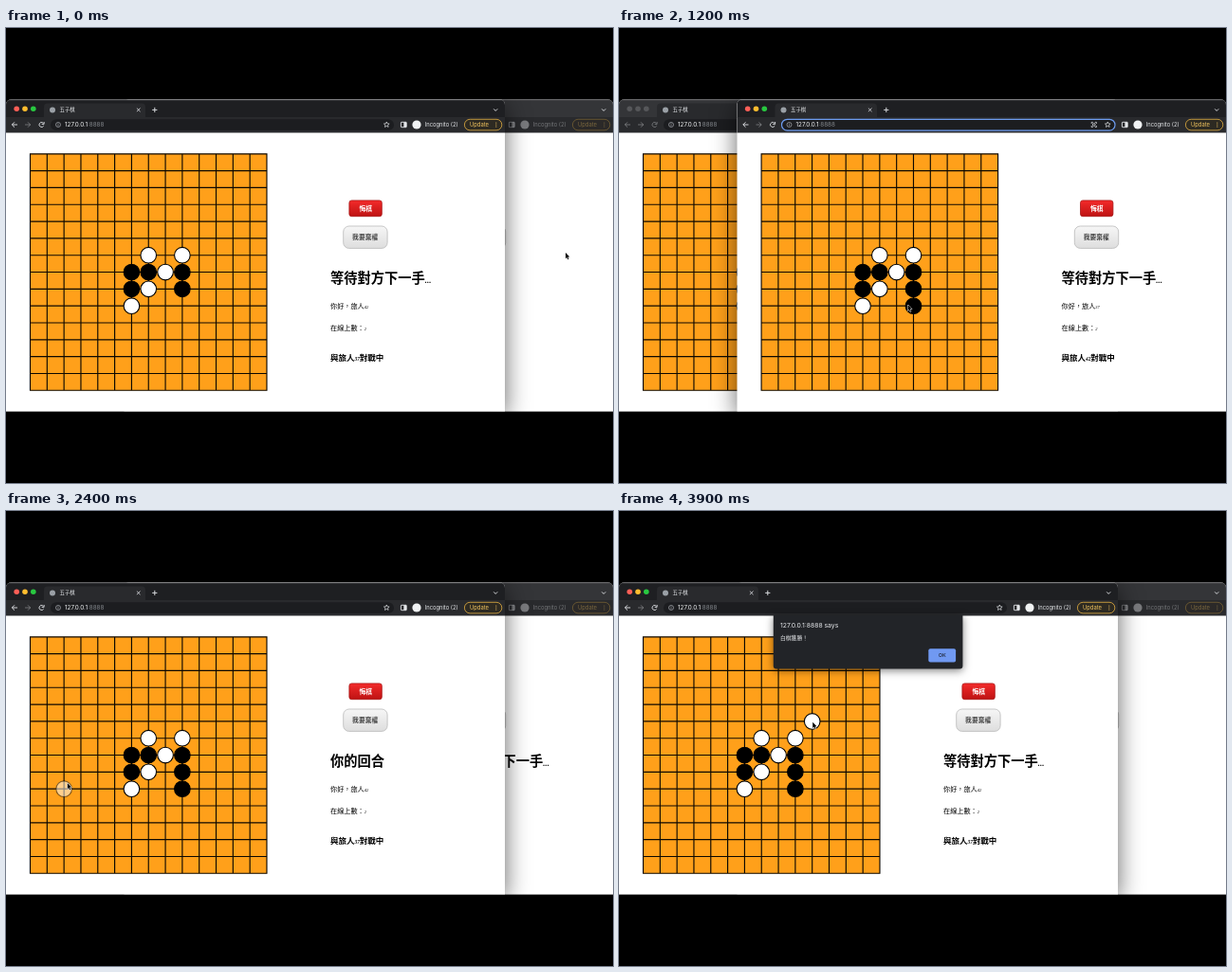
Animation of 640 by 480 pixels, one loop 4 s. Source, as an HTML page with a canvas:

```html
<!DOCTYPE html>
<html lang="zh-Hant">
<head>
<meta charset="utf-8">
<title>五子棋</title>
<style>
html, body { margin: 0; width: 100%; height: 100%; overflow: hidden; background: #000; }
canvas { display: block; }
</style>
</head>
<body>
<canvas id="stage" width="640" height="480"></canvas>
<script>
const ctx = document.getElementById('stage').getContext('2d');
const LOOP = 4000, STEP = 100;
const CELL = 17.82, BOARD = { x: 25.5, y: 132.8, n: 14 };
const UI = 'Inter, Roboto, sans-serif';
const CJK = '"Noto Sans CJK TC", "Noto Sans CJK JP", sans-serif';
const SMALL = '"Liberation Serif", serif';
const MINE = '你的回合', WAIT = '等待對方下一手...';

// Times of the events that change the picture at once
const RAISE_R = 300, FOCUS_R = 400, BLACK_MOVE = 1000, HOVER_L = 1600,
      RAISE_L = 2100, FOCUS_L = 2200, WHITE_MOVE = 3000, ALERT = 3200;

// Pointer stops: time, x, y
const PATH = [
  [0, 590, 237], [300, 580.5, 237], [400, 580.5, 237], [900, 304.5, 292],
  [1300, 304.5, 292], [1600, 112, 295], [1900, 16, 309.5],
  [2200, 16, 309.5], [2800, 204.2, 222.8], [LOOP, 204.2, 222.8]
];

const WHITE = [[7, 6], [9, 6], [8, 7], [7, 8], [6, 9]];
const BLACK = [[6, 7], [7, 7], [9, 7], [6, 8], [9, 8]];

const WIN_L = { x: 0, right: 526, page: 0, tabEnd: 147, pillEnd: 409, me: 42, foe: 37 };
const WIN_R = { x: 124.5, right: 640, page: 124.6, tabEnd: 272, pillEnd: 523, me: 37, foe: 42, typed: true };

function pointer(t) {
  const i = PATH.findIndex((p, k) => k > 0 && t <= p[0]);
  const [t0, x0, y0] = PATH[i - 1], [t1, x1, y1] = PATH[i];
  const u = (t - t0) / (t1 - t0), e = u * u * (3 - 2 * u);
  return { x: x0 + (x1 - x0) * e, y: y0 + (y1 - y0) * e };
}

function box(x, y, w, h, r, fill, stroke, line = 1) {
  ctx.beginPath();
  ctx.roundRect(x, y, w, h, r);
  if (fill) { ctx.fillStyle = fill; ctx.fill(); }
  if (stroke) { ctx.strokeStyle = stroke; ctx.lineWidth = line; ctx.stroke(); }
}

function disc(x, y, r, fill, stroke, line = 1) {
  ctx.beginPath();
  ctx.arc(x, y, r, 0, Math.PI * 2);
  if (fill) { ctx.fillStyle = fill; ctx.fill(); }
  if (stroke) { ctx.strokeStyle = stroke; ctx.lineWidth = line; ctx.stroke(); }
}

function lines(points, color, width = 0.9) {
  ctx.beginPath();
  points.forEach(run => run.forEach(([x, y], i) => i ? ctx.lineTo(x, y) : ctx.moveTo(x, y)));
  ctx.strokeStyle = color;
  ctx.lineWidth = width;
  ctx.stroke();
}

function label(str, x, mid, size, color, { weight = 400, font = UI, align = 'left' } = {}) {
  ctx.font = `${weight} ${size}px ${font}`;
  ctx.textAlign = align;
  ctx.fillStyle = color;
  ctx.fillText(str, x, mid + size * 0.37);
  return ctx.measureText(str).width;
}

// Chinese text whose digits and dots are set in a small slanted face
function mixed(str, x, mid, size, weight) {
  const base = mid + size * 0.37;
  ctx.textAlign = 'left';
  ctx.fillStyle = '#000';
  for (const part of str.split(/([\d.]+)/)) {
    ctx.font = /^[\d.]/.test(part)
      ? `italic ${weight} ${size * 0.62}px ${SMALL}`
      : `${weight} ${size}px ${CJK}`;
    ctx.fillText(part, x, base);
    x += ctx.measureText(part).width;
  }
}

function vertical(y0, y1, top, bottom) {
  const g = ctx.createLinearGradient(0, y0, 0, y1);
  g.addColorStop(0, top);
  g.addColorStop(1, bottom);
  return g;
}

function stone([col, row], white, alpha = 1) {
  ctx.globalAlpha = alpha;
  disc(BOARD.x + col * CELL, BOARD.y + row * CELL, 8.3, white ? '#fff' : '#000', '#000', 1.1);
  ctx.globalAlpha = 1;
}

function board(game) {
  const { x, y, n } = BOARD, side = n * CELL;
  ctx.fillStyle = '#ffa01a';
  ctx.fillRect(x, y, side, side);
  const grid = [];
  for (let i = 0; i <= n; i++) {
    const d = i * CELL;
    grid.push([[x + d, y - 0.5], [x + d, y + side + 0.5]], [[x, y + d], [x + side, y + d]]);
  }
  lines(grid, '#0c0800', 1.15);
  game.white.forEach(s => stone(s, true));
  game.black.forEach(s => stone(s, false));
}

function page(win, game, view) {
  ctx.save();
  ctx.translate(win.page, 0);
  board(game);
  if (view.ghost) stone(view.ghost, view.white, 0.5);
  box(361.9, 181.9, 34.4, 16.8, 2.5, vertical(182, 199, '#f32a2a', '#bd1212'), '#a81616', 0.8);
  label('悔棋', 379.2, 190.2, 6.8, '#fff', { weight: 700, font: CJK, align: 'center' });
  box(355.7, 209, 46.4, 23.4, 6, vertical(209, 232, '#f6f6f6', '#dedede'), '#b9b9b9', 0.8);
  label('我要棄權', 378.7, 220.6, 6.8, '#444', { weight: 700, font: CJK, align: 'center' });
  mixed(view.title, 342, 264, 14.25, 700);
  mixed(`你好，旅人${win.me}`, 342, 293.8, 7.15, 400);
  mixed('在線上數：2', 342, 316, 7.15, 400);
  mixed(`與旅人${win.foe}對戰中`, 342, 347.5, 8.5, 700);
  ctx.restore();
}

function star(x, y, color) {
  const pts = [];
  for (let i = 0; i <= 10; i++) {
    const a = i * Math.PI / 5 - Math.PI / 2, r = i % 2 ? 1.4 : 3;
    pts.push([x + r * Math.cos(a), y + r * Math.sin(a)]);
  }
  lines([pts], color, 0.7);
}

function chrome(win, { lights, active, strip }) {
  const { x, right } = win, ink = '#e6e8eb', bar = '#292a2d';
  ctx.fillStyle = strip ? '#1e1f22' : '#343538';
  ctx.fillRect(x, 75.5, right - x, 19);
  lines([[[x, 76], [right, 76]]], '#55565a', 0.6);
  ['#ff5f57', '#febc2e', '#28c840'].forEach((c, i) =>
    disc(x + 11.2 + i * 8.8, 85.2, 2.8, lights ? c : '#56575a'));

  box(x + 40, 79.5, win.tabEnd - x - 40, 18, [4, 4, 0, 0], bar);
  disc(x + 49, 86.4, 3, '#9aa0a6');
  label('五子棋', x + 56.5, 86.4, 5.4, ink, { font: CJK });
  const cx = win.tabEnd - 7.3, px = win.tabEnd + 9.8;
  lines([[[cx - 1.8, 84.6], [cx + 1.8, 88.2]], [[cx + 1.8, 84.6], [cx - 1.8, 88.2]]], ink, 0.8);
  lines([[[px - 2.6, 86.4], [px + 2.6, 86.4]], [[px, 83.8], [px, 89]]], ink);
  const vx = right - 9.8;
  lines([[[vx - 2, 85.4], [vx, 87.4], [vx + 2, 85.4]]], ink, 0.9);

  ctx.fillStyle = bar;
  ctx.fillRect(x, 94, right - x, 16.5);
  const dim = active ? 1 : 0.4;
  const bx = x + 9, fx = x + 23, rx = x + 37.5, y = 102;
  ctx.globalAlpha = dim;
  lines([[[bx + 3, y], [bx - 2.6, y]], [[bx, y - 2.7], [bx - 2.7, y], [bx, y + 2.7]]], ink);
  ctx.beginPath();
  ctx.arc(rx, y, 2.5, 0.5, Math.PI * 1.75);
  ctx.stroke();
  lines([[[rx + 2.6, y - 3], [rx + 2.6, y - 0.6], [rx + 0.2, y - 0.6]]], ink);
  ctx.globalAlpha = 0.4;
  lines([[[fx - 3, y], [fx + 2.6, y]], [[fx, y - 2.7], [fx + 2.7, y], [fx, y + 2.7]]], ink);
  ctx.globalAlpha = 1;

  box(x + 47, 96.3, win.pillEnd - x - 47, 11.8, 5.9, '#1c1d20', win.typed && '#6d9cf0', 1.2);
  disc(x + 55, y, 2.5, null, '#a9adb2', 0.7);
  lines([[[x + 55, y - 0.5], [x + 55, y + 1.4]], [[x + 55, y - 1.5], [x + 55, y - 0.9]]], '#a9adb2', 0.7);
  const w = label('127.0.0.1', x + 62, y, 6.3, '#f1f3f4');
  label(':8888', x + 62 + w, y, 6.3, '#85898e');
  star(win.pillEnd - 7.7, y, ink);
  if (win.typed) {
    const q = win.pillEnd - 22.2;
    for (const [sx, sy] of [[-1, -1], [1, -1], [-1, 1], [1, 1]])
      lines([[[q + sx * 2.6, y + sy], [q + sx * 2.6, y + sy * 2.6], [q + sx, y + sy * 2.6]]], ink, 0.7);
    box(q - 1.2, y - 1.2, 2.4, 2.4, 0, null, ink, 0.7);
  }

  ctx.globalAlpha = dim;
  box(right - 109.6, y - 2.7, 5.8, 5.4, 0.6, null, ink, 0.9);
  ctx.fillStyle = ink;
  ctx.fillRect(right - 106.6, y - 2.7, 2.8, 5.4);
  disc(right - 93, y, 4.6, '#f1f3f4');
  label('Incognito (2)', right - 84.3, y, 5.8, ink);
  box(right - 42.6, 96.3, 39.4, 11.6, 5.8, '#2d2a22', '#d0a13f', 0.9);
  label('Update', right - 37, y, 5.8, '#f3c55f');
  [-2, 0, 2].forEach(d => disc(right - 9.2, y + d, 0.6, '#f3c55f'));
  ctx.globalAlpha = 1;
}

function browser(win, game, view) {
  const shape = [win.x, 75.5, win.right - win.x, 329.3, [5, 5, 0, 0]];
  ctx.save();
  ctx.shadowColor = 'rgba(0,0,0,0.6)';
  ctx.shadowBlur = view.front ? 26 : 0;
  ctx.shadowOffsetY = 6;
  box(...shape, '#fff');
  ctx.restore();
  ctx.save();
  ctx.beginPath();
  ctx.roundRect(...shape);
  ctx.clip();
  page(win, game, view);
  chrome(win, view);
  ctx.restore();
}

function dialog() {
  ctx.save();
  ctx.shadowColor = 'rgba(0,0,0,0.5)';
  ctx.shadowBlur = 8;
  ctx.shadowOffsetY = 2;
  box(162.8, 110, 199.6, 56.6, [0, 0, 3, 3], '#222428');
  ctx.restore();
  label('127.0.0.1:8888 says', 170, 120.7, 6.8, '#e8eaed');
  label('白棋獲勝！', 170, 134, 5.8, '#e8eaed', { font: CJK });
  box(326.3, 145.3, 28.8, 14.2, 2, '#7099f2');
  label('OK', 340.7, 152.4, 5.4, '#1d2433', { weight: 500, align: 'center' });
}

function arrow({ x, y }) {
  ctx.beginPath();
  [[0, 0], [0, 6.2], [1.4, 5], [2.4, 7.3], [3.4, 6.9], [2.4, 4.6], [4.3, 4.5]]
    .forEach(([dx, dy]) => ctx.lineTo(x + dx, y + dy));
  ctx.closePath();
  ctx.strokeStyle = '#fff';
  ctx.lineWidth = 1;
  ctx.stroke();
  ctx.fillStyle = '#000';
  ctx.fill();
}

// Free crossing nearest to the pointer, or null
function crossing(p, shift, game) {
  const col = Math.round((p.x - BOARD.x - shift) / CELL);
  const row = Math.round((p.y - BOARD.y) / CELL);
  const inside = [col, row].every(v => v >= 0 && v <= BOARD.n);
  const taken = [...game.white, ...game.black].some(s => s[0] === col && s[1] === row);
  return inside && !taken ? [col, row] : null;
}

function draw(t) {
  const p = pointer(t);
  const blackDone = t >= BLACK_MOVE, whiteDone = t >= WHITE_MOVE;
  const whiteTurn = blackDone && !whiteDone;
  const game = {
    white: whiteDone ? [...WHITE, [10, 5]] : WHITE,
    black: blackDone ? [...BLACK, [9, 9]] : BLACK
  };
  const activeR = t >= FOCUS_R && t < FOCUS_L;
  const activeL = !activeR;
  const frontR = t >= RAISE_R && t < RAISE_L;

  let ghostL = null;
  if (whiteTurn && t >= HOVER_L) {
    ghostL = t > FOCUS_L && p.x > 20 && crossing(p, 0, game) || [5, 9];
  }
  const left = {
    front: !frontR, active: activeL, strip: activeL, lights: activeL || t >= RAISE_L,
    title: whiteTurn ? MINE : WAIT, ghost: ghostL, white: true
  };
  const rightView = {
    front: frontR, active: activeR, strip: activeR, lights: activeR,
    title: whiteTurn ? WAIT : MINE, white: false,
    ghost: activeR && !blackDone ? crossing(p, WIN_R.page, game) : null
  };

  ctx.fillStyle = '#000';
  ctx.fillRect(0, 0, 640, 480);
  const order = [[WIN_L, left], [WIN_R, rightView]];
  if (!frontR) order.reverse();
  order.forEach(([win, view]) => browser(win, game, view));
  if (t >= ALERT) dialog();
  ctx.fillStyle = '#000';
  ctx.fillRect(0, 404.8, 640, 76);
  arrow(p);
}

const start = performance.now();
function tick(now) {
  const t = Math.max(0, now - start) % LOOP;
  draw(Math.floor(t / STEP) * STEP);
  requestAnimationFrame(tick);
}
draw(0);
requestAnimationFrame(tick);
</script>
</body>
</html>
```
